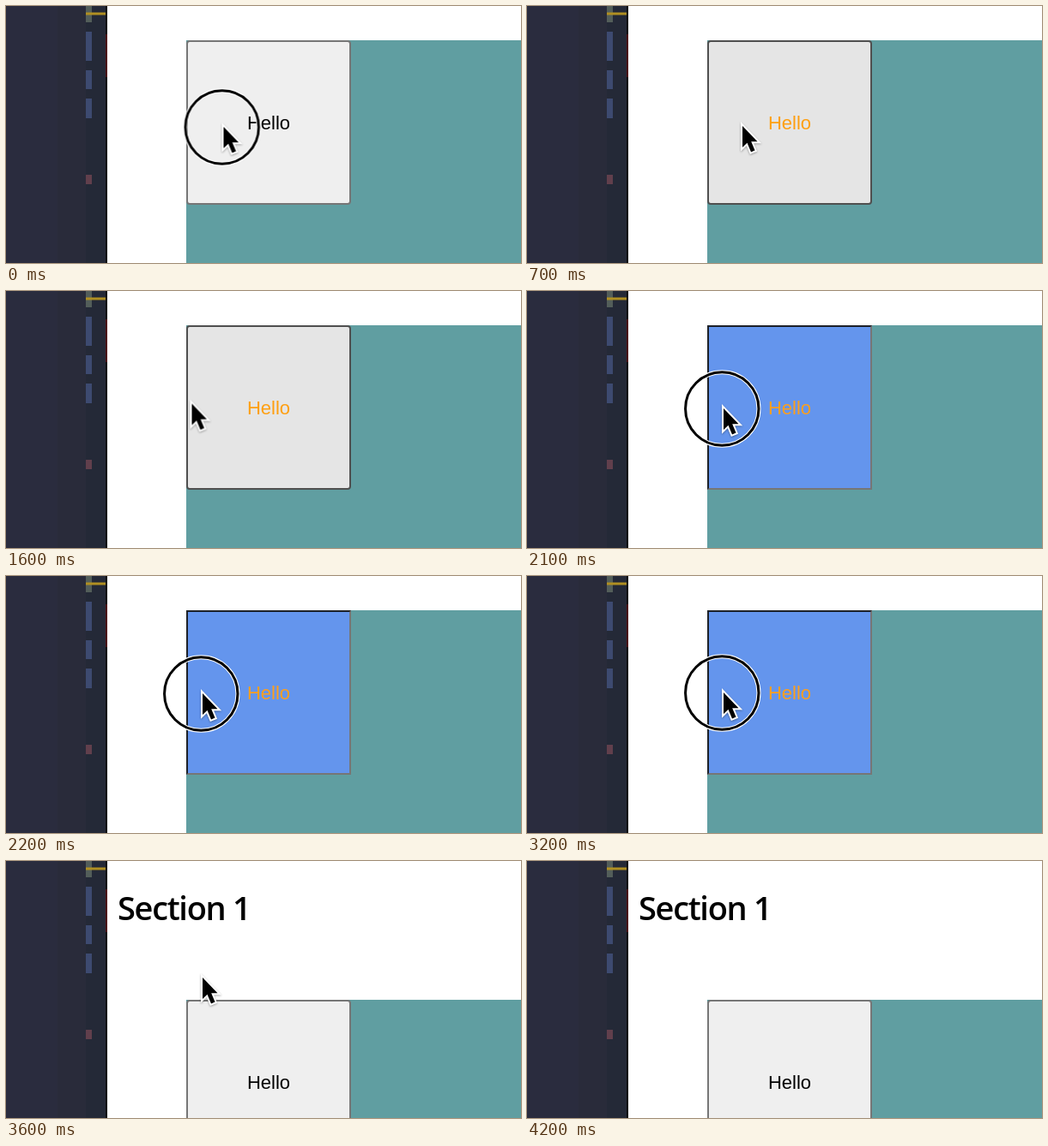
Write an HTML page that moves like this. It is 600 by 300 pixels and loops after 4.6 s.

```html
<!DOCTYPE html>
<html lang="en">
<head>
<meta charset="utf-8">
<title>Button states</title>
<style>
  html, body { margin: 0; width: 100%; height: 100%; overflow: hidden; background: #fff; }

  .stage { position: relative; width: 600px; height: 300px; overflow: hidden; background: #fff; }
  .page, .editor, .cursor, .panel, .button, h1 { position: absolute; }
  .page, .button, .cursor, .ring { animation: 4600ms step-end infinite; }

  .page { inset: 0; animation-name: scroll; }
  .panel { left: 210px; top: 40px; width: 390px; height: 400px; background: #609ea1; }

  h1 {
    left: 130px; top: -88px; margin: 0; white-space: nowrap; color: #000;
    font: 600 38px/40px "Open Sans", "Noto Sans", sans-serif; letter-spacing: -1.3px;
  }

  .button {
    box-sizing: border-box; left: 210px; top: 40px; width: 192px; height: 192px;
    border: 2px solid; text-align: center;
    font: 22px/190px "Liberation Sans", Arial, sans-serif;
    animation-name: button;
  }

  .editor { left: 0; top: 0; }

  .cursor { left: 0; top: 0; width: 1px; height: 1px; overflow: visible; animation-name: move; }
  .ring { fill: none; animation-name: press; }

  @keyframes scroll {
    0% { transform: none; }
    78.26%, 100% { transform: translateY(122px); }
  }

  /* idle, hover, pressed */
  @keyframes button {
    0%, 28.26%, 78.26%, 91.304%, 100% {
      background: #efefef; border-color: #767676; border-radius: 4px; color: #000;
    }
    15.217%, 32.608%, 56.521%, 71.739%, 82.608% {
      background: #e5e5e5; border-color: #4f4f4f; border-radius: 4px; color: #ff9f10;
    }
    45.652%, 63.043% {
      background: #6495ed; border-color: #1d2128 #767676 #767676 #1d2128;
      border-radius: 0; color: #ff9f1c;
    }
  }

  @keyframes press {
    0%, 45.652%, 63.043% { opacity: 1; }
    15.217%, 56.521%, 71.739%, 100% { opacity: 0; }
  }

  @keyframes move {
    0% { transform: translate(253.5px, 141px); }
    15.217% { transform: translate(251px, 140px); }
    17.391% { transform: translate(244px, 137px); }
    19.565% { transform: translate(232px, 134px); }
    21.739% { transform: translate(221px, 132px); }
    23.913% { transform: translate(214.5px, 131px); }
    26.086% { transform: translate(213px, 131px); }
    28.26% { transform: translate(199px, 131px); }
    30.434% { transform: translate(191px, 131px); }
    32.608% { transform: translate(211px, 131px); }
    34.782% { transform: translate(216.5px, 131.5px); }
    36.956% { transform: translate(223px, 135px); }
    39.13% { transform: translate(227px, 137px); }
    41.304% { transform: translate(229px, 137px); }
    63.043% { transform: translate(229px, 136px); }
    80.434% { transform: translate(229px, 146px); }
    82.608% { transform: translate(231px, 172px); }
    84.782% { transform: translate(235px, 208px); }
    86.956% { transform: translate(239px, 246px); }
    89.13% { transform: translate(242px, 280px); }
    91.304%, 100% { transform: translate(244px, 340px); }
  }
</style>
</head>
<body>
<div class="stage">
  <div class="page">
    <h1>Section 1</h1>
    <div class="panel"></div>
    <div class="button">Hello</div>
  </div>

  <svg class="editor" width="118" height="300">
    <rect width="118" height="300" fill="#2a2c3e"/>
    <rect x="60" width="33" height="300" fill="#292b3a"/>
    <rect x="93" width="23" height="300" fill="#242937"/>
    <rect x="93" width="7" height="19" fill="#535e5a"/>
    <path d="M93 30h7v34h-7zM93 75h7v22h-7zM93 108h7v23h-7z" fill="#3d4a70"/>
    <rect x="93" y="197" width="7" height="11" fill="#613f4c"/>
    <rect x="93" y="7.5" width="23" height="3" fill="#b08f22"/>
    <rect x="116" width="2" height="300" fill="#050507"/>
    <rect x="116" y="33" width="2" height="50" fill="#4a0712"/>
  </svg>

  <svg class="cursor">
    <g class="ring">
      <circle cx="-1.75" cy=".5" r="42.7" stroke="#fff" stroke-width="5"/>
      <circle cx="-1.75" cy=".5" r="42.7" stroke="#000" stroke-width="3"/>
    </g>
    <path d="M0 0V25L5.5 19.8L10 30.5L14.5 28.6L10.2 18.2H17.5Z" stroke="#fff" stroke-width="4"
          paint-order="stroke" style="filter: drop-shadow(0 1px 1px #0005)"/>
  </svg>
</div>
</body>
</html>
```
